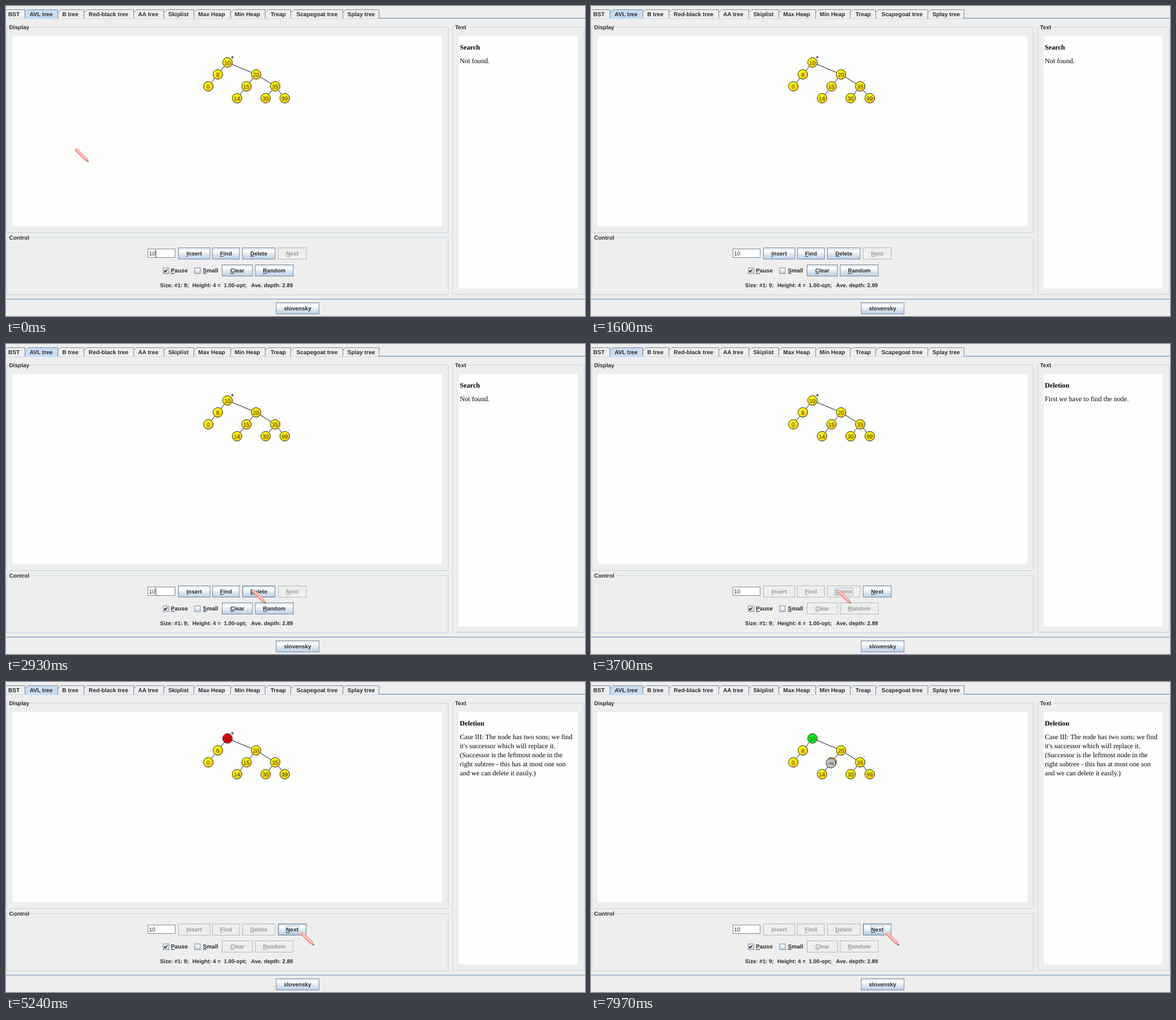
Animation of 1022 by 548 pixels, one loop 8 s. Source, as an HTML page:

```html
<!DOCTYPE html>
<html lang="en">
<head>
<meta charset="utf-8">
<title>AVL tree deletion</title>
<style>
  html, body { margin: 0; width: 100%; height: 100%; overflow: hidden; background: #eee; }
  svg { display: block; width: 1022px; height: 548px; overflow: hidden; }
  text { font: bold 10px "Liberation Sans", Arial, sans-serif; fill: #2c2c2c; text-rendering: geometricPrecision; white-space: pre; }
  .tab { font-size: 10.15px; }
  .status { font-size: 9.7px; }
  .plain { font-weight: normal; }
  .serif { font: 12.15px "Liberation Serif", "Times New Roman", serif; fill: #000; }
  .head { font-weight: bold; }
  .mid { text-anchor: middle; }
  .key { text-decoration: underline; }
</style>
</head>
<body>
<svg id="stage" viewBox="0 0 1022 548" xmlns="http://www.w3.org/2000/svg">
  <defs>
    <linearGradient id="button" x1="0" y1="0" x2="0" y2="1">
      <stop offset="0" stop-color="#dde8f3"/>
      <stop offset=".3" stop-color="#fff"/>
      <stop offset=".5" stop-color="#e6eef6"/>
      <stop offset="1" stop-color="#b8cfe5"/>
    </linearGradient>
    <linearGradient id="yellow" x1="0" y1="0" x2="1" y2="1">
      <stop offset=".2" stop-color="#ffff10"/>
      <stop offset=".85" stop-color="#ffc800"/>
    </linearGradient>
    <linearGradient id="pencil" x1="0" y1="0" x2="0" y2="1">
      <stop offset="0" stop-color="#f08a7e"/>
      <stop offset=".45" stop-color="#fde0da"/>
      <stop offset=".65" stop-color="#f6b0a6"/>
      <stop offset="1" stop-color="#e46a5e"/>
    </linearGradient>
  </defs>
</svg>
<script>
const LOOP = 8000;
const LINE = '#7a8a99', BLUE = '#b8cfe5', DARK = '#2c2c2c', FADED = '#9a9a92';
const stage = document.getElementById('stage');

function add(tag, attrs, parent = stage, content = '') {
  const el = document.createElementNS('http://www.w3.org/2000/svg', tag);
  for (const k in attrs) el.setAttribute(k, attrs[k]);
  if (content) el.textContent = content;
  parent.appendChild(el);
  return el;
}
const rect = (x, y, width, height, fill, stroke = 'none', parent = stage) =>
  add('rect', { x, y, width, height, fill, stroke }, parent);
const path = (d, stroke, fill = 'none', parent = stage) => add('path', { d, stroke, fill }, parent);
const label = (x, y, s, cls = '', parent = stage) => add('text', { x, y, class: cls }, parent, s);
const show = (el, on) => el.setAttribute('visibility', on ? 'visible' : 'hidden');

function keyLabel(x, y, s, cls) {
  const el = label(x, y, '', cls);
  add('tspan', { class: 'key' }, el, s[0]);
  add('tspan', {}, el, s.slice(1));
  return el;
}

// Tab row: name, left edge, right edge, text centre
const tabs = [
  ['BST', -5, 33, 14], ['AVL tree', 33, 91, 62], ['B tree', 91, 137, 113.5],
  ['Red-black tree', 137, 225, 181], ['AA tree', 225, 278, 251], ['Skiplist', 278, 331, 304.5],
  ['Max Heap', 331, 396, 363], ['Min Heap', 396, 457, 426], ['Treap', 457, 502, 480.5],
  ['Scapegoat tree', 502, 594, 549], ['Splay tree', 594, 658, 627]
];
rect(0, 0, 1022, 548, '#eee');
rect(0, 21, 1022, 2, '#c8ddf2');
path('M0 21.5H1022', LINE);
tabs.forEach(([name, x, end, mid], i) => {
  const open = i === 1;
  path(`M${x + .5} 22V11.5L${x + 5.5} 6.5H${end + .5}V22`, LINE, open ? '#c8ddf2' : '#eee');
  if (open) rect(x + 1, 21, end - x - 1, 2, '#c8ddf2');
  label(mid, 18, name, 'tab mid');
});

// Titled panels with their white areas
function panel(title, x, y, right, bottom, gap) {
  path(`M${x + 3} ${y}H${x}V${bottom}H${right}V${y}H${gap}`, '#c3d3e2');
  label(x + 4, y + 3.2, title);
}
panel('Display', 1.5, 37.5, 780.5, 400.5, 43);
panel('Control', 1.5, 409.5, 780.5, 510.5, 43);
panel('Text', 788.5, 37.5, 1020.5, 509.5, 816);
rect(11.5, 53, 758.5, 336.5, '#fefefc');
rect(799, 53, 210, 446.5, '#fefefc');
rect(0, 517, 1022, 2, BLUE);
path('M0 518.5H1022', '#8fa9c2');

// Controls
rect(250.5, 429.5, 48, 15, '#fff', LINE);
label(252.5, 441, '10', 'plain');
const caret = path('M264.5 431V444', '#333');

function button(name, x, y, w, plainName) {
  const box = rect(x + .5, y + .5, w - .5, 20, 'url(#button)', LINE);
  const glow = rect(x + 1.5, y + 1.5, w - 2.5, 18, 'none', '#a6c2d6');
  const cx = x + w / 2 + .2;
  const text = (plainName ? label : keyLabel)(cx, y + 14.2, name, 'mid');
  const half = name.length * 2.5 + 1.5;
  const focus = rect(Math.round(cx - half) - .5, y + 4.5, Math.round(half * 2), 13, 'none', '#a8bfda');
  return (enabled, hover, focused) => {
    box.setAttribute('fill', enabled ? 'url(#button)' : '#eee');
    box.setAttribute('stroke', enabled ? LINE : '#b4b8ba');
    text.style.fill = enabled ? DARK : FADED;
    show(glow, hover);
    show(focus, focused);
  };
}
const insertBtn = button('Insert', 304, 427, 56);
const findBtn = button('Find', 364, 427, 48);
const deleteBtn = button('Delete', 417, 427, 58);
const nextBtn = button('Next', 480, 427, 50);
const clearBtn = button('Clear', 381, 457, 54);
const randomBtn = button('Random', 439.5, 457, 67.5);
button('slovensky', 476.5, 524, 76, true)(true, false, false);

[[277, 'Pause', 291], [332.5, 'Small', 347.5]].forEach(([x, name, tx]) => {
  rect(x + .5, 463, 10, 10, 'url(#button)', LINE);
  keyLabel(tx, 471.3, name, 'tab');
});
path('M280 467V470.5M280.5 470.5L285 465.5', '#222').setAttribute('stroke-width', 1.6);

[[272, 'Size: #1: 9;'], [329, 'Height: 4 ='], [384.5, '1.00-opt;'], [432.5, 'Ave. depth: 2.89']]
  .forEach(([x, s]) => label(x, 497, s, 'status'));

// Explanations
function note(title, lines) {
  const g = add('g', {});
  label(801, 76.5, title, 'serif head', g);
  lines.forEach((s, i) => label(801, 101 + i * 16, s, 'serif', g));
  return g;
}
const notFound = note('Search', ['Not found.']);
const findFirst = note('Deletion', ['First we have to find the node.']);
const caseThree = note('Deletion', [
  'Case III: The node has two sons; we find', "it's successor which will replace it.",
  '(Successor is the leftmost node in the', 'right subtree - this has at most one son',
  'and we can delete it easily.)'
]);

// Tree: value -> x, y, parent
const tree = {
  10: [391, 99.8], 8: [374, 120.9, 10], 0: [357.2, 142, 8], 20: [441.5, 120.9, 10],
  15: [424.6, 142, 20], 35: [475.2, 142, 20], 14: [407.8, 163, 15],
  30: [458.3, 163, 35], 99: [492, 163, 35]
};
for (const v in tree) {
  const [x, y, up] = tree[v];
  if (up) path(`M${x} ${y}L${tree[up][0]} ${tree[up][1]}`, '#111');
}
function node(s, x, y, fill) {
  const g = add('g', { transform: `translate(${x} ${y})` });
  const disc = add('circle', { r: 8.5, fill, stroke: '#222' }, g);
  const text = label(-.3, 3.8, s, 'plain mid', g);
  return { g, disc, text };
}
const nodes = {};
for (const v in tree) nodes[v] = node(v, tree[v][0], tree[v][1], 'url(#yellow)');
[[449, 110], [482, 131], [499, 152]].forEach(([x, y]) => rect(x, y, 1, 1, '#333'));
const plus = path('M397 90.5H402M399.5 88V93', '#222');
const seeker = node('-∞', 0, 0, '#c0c0c6');

// Pencil pointer; its hot spot is the blunt end
const pencil = add('g', {});
const pencilArt = add('g', { transform: 'translate(2 2) rotate(45)' }, pencil);
add('rect', { x: -1.5, y: -3.8, width: 29, height: 7.6, rx: 3.5, fill: '#fad2cb', opacity: .45 }, pencilArt);
add('rect', { x: 0, y: -2.5, width: 26, height: 5, rx: 1.5, fill: 'url(#pencil)', stroke: '#ec9287', 'stroke-width': .5 }, pencilArt);
path('M26 -2.5L31.5 0L26 2.5Z', '#c98a70', '#e8b494', pencilArt).setAttribute('stroke-width', .6);
path('M29.5 -.7L32 0L29.5 .7Z', '#5a3a32', '#5a3a32', pencilArt).setAttribute('stroke-width', .6);

const ease = p => p * p * (3 - 2 * p);
// Position along [time, x, y] stops
function along(stops, t) {
  let i = 0;
  while (i < stops.length - 2 && t >= stops[i + 1][0]) i++;
  const [t0, x0, y0] = stops[i], [t1, x1, y1] = stops[i + 1];
  const p = ease(Math.min(1, Math.max(0, (t - t0) / (t1 - t0))));
  return [x0 + (x1 - x0) * p, y0 + (y1 - y0) * p];
}
const place = (el, [x, y]) => el.setAttribute('transform', `translate(${x.toFixed(2)} ${y.toFixed(2)})`);

const at = (time, v) => [time, tree[v][0], tree[v][1]];
const pointerWay = [
  [350, 121, 251], [1060, -40, 300], [1700, 330, 560], [2600, 434, 434],
  [3900, 434, 434], [4450, 519, 441]
];
const seekerWay = [at(5640, 10), at(6140, 20), at(7000, 20), at(7500, 15), at(7890, 15), at(8390, 14)];
const CLICK = 3080, CASE = 4760, SEEK = 5640;

function draw(t) {
  const idle = t < CLICK, found = t >= CASE, seeking = t >= SEEK;
  place(pencil, along(pointerWay, t));
  show(pencil, t < 1060 || t > 1700);
  show(caret, idle && (t + 250) % 1000 < 500);

  for (const btn of [insertBtn, findBtn, clearBtn, randomBtn]) btn(idle, false, false);
  deleteBtn(idle, idle && t >= 2480, !idle && t < 4600);
  nextBtn(!idle, t >= 4300, t >= 4600);

  show(notFound, idle);
  show(findFirst, !idle && !found);
  show(caseThree, found);

  nodes[10].disc.setAttribute('fill', seeking ? '#10f020' : found ? '#e00808' : 'url(#yellow)');
  nodes[10].text.style.fill = seeking ? '#0a5a10' : found ? '#600' : DARK;
  show(plus, !seeking);
  show(seeker.g, seeking);
  place(seeker.g, along(seekerWay, t));
}

const start = performance.now();
function tick(now) {
  draw(Math.max(0, now - start) % LOOP);
  requestAnimationFrame(tick);
}
draw(0);
requestAnimationFrame(tick);
</script>
</body>
</html>
```
